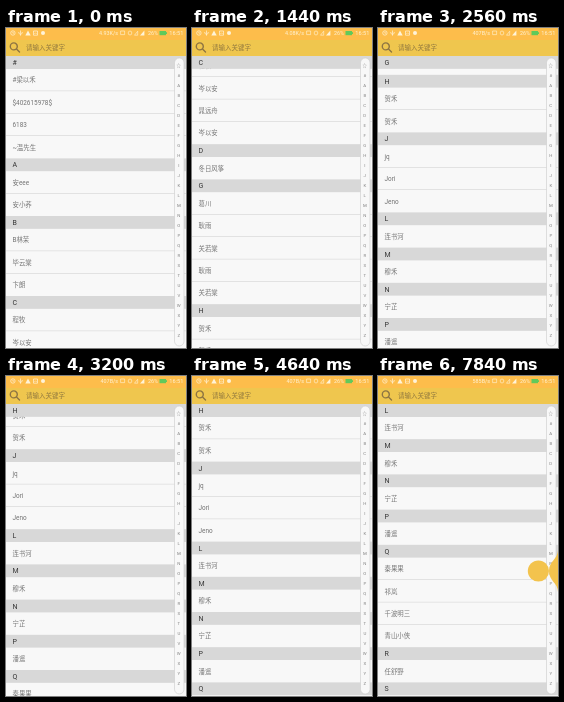
These frames come from a looping animation (180x320 px, 8 s). An HTML page with a canvas:

```html
<!DOCTYPE html>
<html lang="zh">
<head>
<meta charset="utf-8">
<title>Contacts</title>
<style>
html, body { margin: 0; width: 100%; height: 100%; overflow: hidden; background: #f8f8f8; }
canvas { display: block; width: 180px; height: 320px; }
</style>
</head>
<body>
<canvas id="stage"></canvas>
<script>
const W = 180, H = 320, LOOP = 8000, STEP = 160;
const TOP = 28, HEAD = 12.8, ROW = 22.4;
const FONT = 'Roboto, "Noto Sans CJK SC", "Noto Sans CJK", sans-serif';
const AMBER = '#f3c34d';

const canvas = document.getElementById('stage');
const ratio = Math.max(1, window.devicePixelRatio || 1);
canvas.width = W * ratio;
canvas.height = H * ratio;
const ctx = canvas.getContext('2d');
ctx.scale(ratio, ratio);

const groups = [
  ['#', '#梁以禾', '$402615978$', '6183', '~温先生'],
  ['A', '安eee', '安小荞'],
  ['B', 'B林茉', '毕云棠', '卞朗'],
  ['C', '程牧', '岑以安', '晁远舟', '岑以安'],
  ['D', '冬日风筝'],
  ['G', '葛川', '耿雨', '关若棠', '耿雨', '关若棠'],
  ['H', '贺禾', '贺禾'],
  ['J', 'jq', 'Jori', 'Jeno'],
  ['L', '连书河'],
  ['M', '穆禾'],
  ['N', '宁芷'],
  ['P', '潘遥'],
  ['Q', '秦果果', '祁岚', '千波明三', '青山小侠'],
  ['R', '任舒野'],
  ['S']
];
let end = 0;
const sections = groups.map(([letter, ...names]) => {
  const section = { letter, names, top: end };
  end += HEAD + names.length * ROW;
  return section;
});

// [time, value] pairs, joined by straight lines
const scrollKeys = [
  [0, 0], [1440, 254.2], [2080, 400], [2560, 483.6], [2880, 505], [3200, 514.8],
  [3520, 514], [4480, 502.4], [6239, 502.4], [6240, 640]
];
const bubbleIn = [[5280, 0], [5440, 0.35], [5600, 0.75], [5760, 1]];
const bubbleY = [[5440, 159], [6080, 162], [6400, 166], [7200, 166], [7840, 195]];
const speeds = [[0, '4.93K/s'], [1280, '4.08K/s'], [2400, '407B/s'], [6400, '585B/s']];

function at(keys, t) {
  const i = keys.findIndex(k => k[0] > t);
  if (i === 0) return keys[0][1];
  if (i < 0) return keys[keys.length - 1][1];
  const [t0, a] = keys[i - 1], [t1, b] = keys[i];
  return a + (b - a) * (t - t0) / (t1 - t0);
}

function rect(x, y, w, h, color) {
  ctx.fillStyle = color;
  ctx.fillRect(x, y, w, h);
}

function text(str, x, y, size, color, align = 'left') {
  ctx.font = `${size}px ${FONT}`;
  ctx.fillStyle = color;
  ctx.textAlign = align;
  ctx.textBaseline = 'alphabetic';
  ctx.fillText(str, x, y + size * 0.36);
}

function stroke(d, color, width) {
  ctx.strokeStyle = color;
  ctx.lineWidth = width;
  ctx.stroke(new Path2D(d));
}

function disc(x, y, r, color) {
  ctx.fillStyle = color;
  ctx.beginPath();
  ctx.arc(x, y, r, 0, Math.PI * 2);
  ctx.fill();
}

function header(letter, y) {
  rect(0, y, W, HEAD, '#d8d8d8');
  text(letter, 6.5, y + HEAD / 2, 7, '#333');
}

function drawList(scroll) {
  ctx.save();
  ctx.beginPath();
  ctx.rect(0, TOP, W, H - TOP);
  ctx.clip();
  for (const { letter, names, top } of sections) {
    const y = TOP + top - scroll;
    names.forEach((name, i) => {
      const rowY = y + HEAD + i * ROW;
      if (rowY > H || rowY + ROW < TOP) return;
      text(name, 6.5, rowY + ROW / 2, 6.4, '#747474');
      if (i < names.length - 1) rect(0, rowY + ROW - 0.6, W, 0.6, '#d4d4d4');
    });
    header(letter, y);
  }
  // The pinned header is pushed up by the next one
  const next = sections.findIndex(s => s.top > scroll);
  const push = Math.min(0, sections[next].top - scroll - HEAD);
  header(sections[next - 1].letter, TOP + push);
  ctx.restore();
}

function drawIndex() {
  ctx.beginPath();
  ctx.roundRect(168.5, 30, 9.5, 288, 4.75);
  ctx.fillStyle = '#f8f8f8';
  ctx.fill();
  ctx.strokeStyle = '#cbcbcb';
  ctx.lineWidth = 0.6;
  ctx.stroke();
  [...'☆#ABCDEFGHIJKLMNOPQRSTUVWXYZ'].forEach((c, i) =>
    text(c, 172.8, 37 + i * 10, 4.4, '#858585', 'center'));
}

function drawBubble(t) {
  const show = at(bubbleIn, t);
  if (!show) return;
  const y = at(bubbleY, t), tip = W - 9 * show;
  ctx.fillStyle = AMBER;
  ctx.fill(new Path2D(`M180 ${y - 21}C180 ${y - 12} ${tip} ${y - 10} ${tip} ${y}` +
    `S180 ${y + 12} 180 ${y + 21}Z`));
  disc(191 - 30.6 * show, y, 10.6, AMBER);
}

function drawBars(t) {
  rect(0, 0, W, 12, '#fdbd4b');
  rect(0, 12, W, 16, '#efc64e');

  const white = '#fff3d8';
  stroke('M4.7 5a2.2 2.2 0 1 0 4.4 0a2.2 2.2 0 1 0-4.4 0M6.9 3.8v1.4h1', white, 0.7);
  stroke('M14.5 2.5v5.2M12.8 4v1.3l1.7 1.2l1.7-1.2V4', white, 0.7);
  ctx.fillStyle = white;
  ctx.fill(new Path2D('M22 2.5l2.7 5h-5.4z'));
  stroke('M27.5 3h4v4.2h-4zM28.5 5.8l1-1l1 1', white, 0.7);
  disc(37, 5, 2, white);

  const speed = speeds.filter(s => s[0] <= t).pop()[1];
  text(speed, 112, 5.2, 5.4, white, 'right');
  stroke('M114.6 3h4v3.6h-4zM122.2 5a1.8 2 0 1 0 3.6 0a1.8 2 0 1 0-3.6 0', white, 0.6);
  stroke('M128.5 7.2l3.2-4v4z', white, 0.6);
  ctx.fillStyle = white;
  ctx.fill(new Path2D('M134 7.5l4.4-5v5z'));
  text('26%', 152, 5.2, 5.4, white, 'right');
  rect(153.5, 3, 6.5, 4.2, '#61c95b');
  rect(160, 4.2, 1, 1.8, '#61c95b');
  text('16:51', 177.3, 5.2, 5.6, white, 'right');

  const brown = '#8d7442';
  ctx.lineCap = 'round';
  stroke('M4.3 18.4a3.5 3.5 0 1 0 7 0a3.5 3.5 0 1 0-7 0M10.5 21l3 3', brown, 1.4);
  ctx.lineCap = 'butt';
  text('请输入关键字', 20, 19.6, 6.5, '#90783f');
}

function draw(now) {
  const t = Math.floor(now % LOOP / STEP) * STEP;
  rect(0, 0, W, H, '#f8f8f8');
  drawList(at(scrollKeys, t));
  drawIndex();
  drawBubble(t);
  drawBars(t);
}

const start = performance.now();
function tick() {
  draw(performance.now() - start);
  requestAnimationFrame(tick);
}
tick();
</script>
</body>
</html>
```
